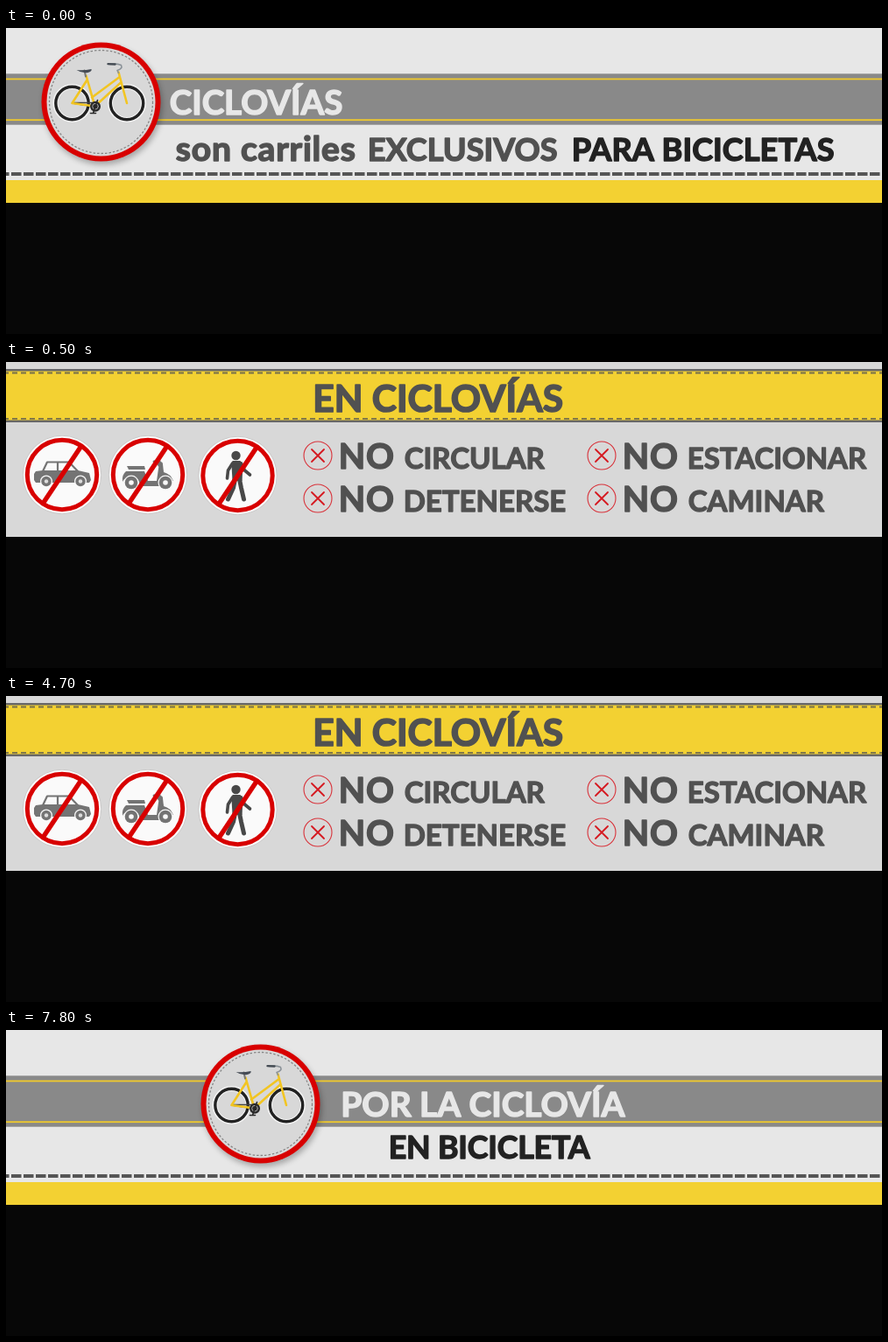
An HTML page with a canvas that plays this animation: 1000x350 px, repeating every 8000 ms.

```html
<!DOCTYPE html>
<html lang="es">
<head>
<meta charset="utf-8">
<title>Ciclovías</title>
<style>
html, body { margin: 0; width: 100%; height: 100%; overflow: hidden; background: #070707; }
canvas { display: block; }
</style>
</head>
<body>
<canvas id="stage" width="1000" height="350"></canvas>
<script>
const ctx = document.getElementById('stage').getContext('2d');
const LOOP = 8000;
const RED = '#d80000', YELLOW = '#f3d132', DARK = '#515151', INK = '#222', PALE = '#e7e7e7', ICON = '#747474';

function rect(x, y, w, h, color) {
  ctx.fillStyle = color;
  ctx.fillRect(x, y, w, h);
}

function disc(x, y, r, color) {
  ctx.fillStyle = color;
  ctx.beginPath();
  ctx.arc(x, y, r, 0, Math.PI * 2);
  ctx.fill();
}

function ring(x, y, r, color, width) {
  ctx.strokeStyle = color;
  ctx.lineWidth = width;
  ctx.beginPath();
  ctx.arc(x, y, r, 0, Math.PI * 2);
  ctx.stroke();
}

function stroke(path, color, width) {
  ctx.strokeStyle = color;
  ctx.lineWidth = width;
  ctx.stroke(new Path2D(path));
}

function fill(path, color) {
  ctx.fillStyle = color;
  ctx.fill(new Path2D(path));
}

function dashes(y, on, off, shift, color, width) {
  ctx.save();
  ctx.lineCap = 'butt';
  ctx.setLineDash([on, off]);
  ctx.lineDashOffset = shift;
  stroke(`M0 ${y}H1000`, color, width);
  ctx.restore();
}

// Bold text with softened corners; x is the left edge of the ink.
function text(str, x, y, size, color, spacing = 0) {
  const soft = size * 0.04;
  ctx.font = `bold ${size}px Lato, "Open Sans", sans-serif`;
  ctx.letterSpacing = spacing + 'px';
  const left = x + ctx.measureText(str).actualBoundingBoxLeft + soft / 2;
  ctx.fillStyle = ctx.strokeStyle = color;
  ctx.lineWidth = soft;
  ctx.fillText(str, left, y - soft / 2);
  ctx.strokeText(str, left, y - soft / 2);
}

function road() {
  rect(0, 0, 1000, 200, PALE);
  rect(0, 52, 1000, 59, '#a5a5a5');
  rect(0, 53, 1000, 57, '#898989');
  rect(0, 57.5, 1000, 1.8, '#f0c92c');
  rect(0, 104.3, 1000, 1.8, '#f0c92c');
  dashes(167, 11.5, 2.5, 8, '#555', 4);
  rect(0, 174, 1000, 26, YELLOW);
}

function bicycle() {
  for (const x of [-33, 29.5]) {
    ring(x, 1.5, 19, '#f4f4f4', 6);
    ring(x, 1.5, 18.7, '#222', 3.4);
  }
  stroke('M-33 1.5L-7 5.5M-33 1L-7 1', '#444', 1.3);
  stroke('M-33 1.5L-16 -25M-33 1.5L-7 5M-17 -30L-7 5L22.5 -22M-10.5 -5L20.5 -28M20 -34L29.5 1.5', '#f2c522', 2.6);
  stroke('M-17.5 -29L-19 -36', '#777', 2);
  fill('M-28 -36.5Q-20 -35.5 -11 -37.5Q-10 -35 -15 -33.5Q-22 -32.5 -28 -36.5Z', '#454b55');
  stroke('M20 -33L18.5 -36Q25 -38 23 -42Q18 -44 10 -43', '#8b9298', 1.6);
  stroke('M8 -43.4L16 -43', '#444b53', 2.4);
  disc(-6.5, 5.2, 6, '#292929');
  ring(-6.5, 5.2, 3.3, '#aaa', 1);
  stroke('M-6.5 5L-9 13M-12 13H-6M-6.5 5L-4 -2', '#292929', 1.6);
}

function badge(x, y) {
  ctx.save();
  ctx.translate(x, y);
  ctx.shadowColor = 'rgba(0,0,0,.28)';
  ctx.shadowBlur = 6;
  ctx.shadowOffsetX = 2;
  ctx.shadowOffsetY = 4;
  disc(0, 0, 68, RED);
  ctx.shadowColor = 'transparent';
  disc(0, 0, 62, '#d8d8d8');
  ctx.lineCap = 'butt';
  ctx.setLineDash([2.5, 2]);
  ring(0, 0, 59, '#868686', 1.3);
  ctx.setLineDash([]);
  ctx.lineCap = 'round';
  bicycle();
  ctx.restore();
}

function car() {
  stroke('M-22 -4L-17 -14.5H8L18 -4M-5 -14V-4', ICON, 2.2);
  fill('M-32 -1L-30 -4L-22 -5H18L31 -2L33 6L31 9H-30L-32 6Z', ICON);
  for (const x of [-18, 21]) {
    disc(x, 7.5, 7, '#fafafa');
    disc(x, 7.5, 5.7, ICON);
    disc(x, 7.5, 2.2, '#ddd');
  }
}

function scooter() {
  fill('M-24 -10H-4L-3 -6H-22ZM-25 -4H-4L0 7H10L13 -14L17 -12L18 -3Q26 -1 29 7Q21 3 17 9L13 13H-9Q-10 2 -19 2Q-27 3 -29 8Q-30 0 -25 -4Z', ICON);
  stroke('M7 -15L13 -16L17 0', ICON, 2.8);
  disc(14, -12, 3, ICON);
  for (const x of [-19, 20]) {
    disc(x, 9, 8.5, '#fafafa');
    disc(x, 9, 7.3, ICON);
    disc(x, 9, 2.8, '#fafafa');
  }
}

function walker() {
  const c = '#484848';
  disc(-2, -23, 5.2, c);
  fill('M-6 -17H3L6 -12L5 6H-6L-7 -12Z', c);
  stroke('M-6 -14L-11 -6L-12 3M4 -14L8 -6L14 -1', c, 3.6);
  stroke('M-3 4L-5 14L-11 27M2 4L4 14L7 27', c, 5);
}

function ban(x, y, icon) {
  ctx.save();
  ctx.translate(x, y);
  disc(0, 0, 45, '#c8c8c8');
  disc(0, 0, 44.2, '#fafafa');
  icon();
  ctx.lineCap = 'butt';
  stroke('M-22 33L22 -33', RED, 5.4);
  ring(0, 0, 39.7, RED, 5);
  ctx.restore();
}

function rule(x, y, word) {
  ring(x, y, 16, '#d8323a', 1.1);
  stroke(`M${x - 7} ${y - 7}l14 14m0 -14l-14 14`, '#d51920', 1.8);
  text('NO', x + 26, y + 15.5, 39.5, DARK, 0.8);
  text(word, x + 99, y + 15.5, 33, DARK);
}

function intro() {
  road();
  badge(108.5, 84.5);
  text('CICLOVÍAS', 187, 99.5, 38.5, PALE);
  text('son carriles', 193, 152.5, 39, DARK, 0.8);
  text('EXCLUSIVOS', 414, 152.5, 36.2, DARK);
  text('PARA BICICLETAS', 647, 152.5, 36.2, INK);
}

function rules() {
  rect(0, 0, 1000, 200, '#d8d8d8');
  rect(0, 8, 1000, 61, '#686868');
  rect(0, 10.5, 1000, 56, YELLOW);
  dashes(12.5, 6, 4, 3, '#77704a', 1.8);
  dashes(64.8, 6, 4, 3, '#77704a', 1.8);
  text('EN CICLOVÍAS', 352.5, 57.5, 42.5, DARK);
  ban(64, 129, car);
  ban(162, 129, scooter);
  ban(264.5, 130, walker);
  rule(356, 107, 'CIRCULAR');
  rule(680, 107, 'ESTACIONAR');
  rule(356, 156, 'DETENERSE');
  rule(680, 156, 'CAMINAR');
}

function outro() {
  road();
  badge(290.5, 84.5);
  text('POR LA CICLOVÍA', 384.5, 100, 38.8, PALE);
  text('EN BICICLETA', 438, 147.5, 35.8, INK, -0.2);
}

function draw() {
  const t = performance.now() % LOOP;
  ctx.lineJoin = 'round';
  ctx.lineCap = 'round';
  rect(0, 0, 1000, 350, '#070707');
  if (t < 500) intro();
  else if (t < 7500) rules();
  else outro();
  requestAnimationFrame(draw);
}

draw();
</script>
</body>
</html>
```
